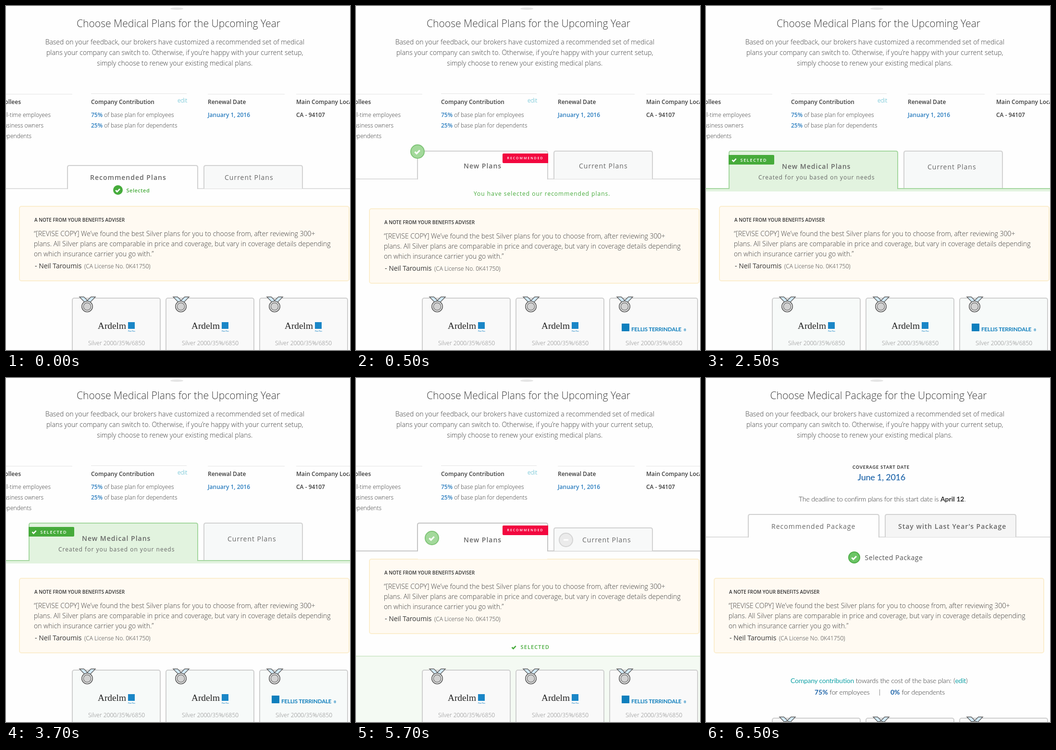
These frames come from a looping animation (716x716 px, 8000 ms). An HTML page:

```html
<!DOCTYPE html>
<html lang="en">
<head>
<meta charset="utf-8">
<title>Medical plan tabs</title>
<style>
html, body { margin: 0; width: 100%; height: 100%; overflow: hidden; background: #fefefe; }
svg { display: block; width: 716px; height: 716px; font-family: "Open Sans", sans-serif; }
text { white-space: pre; }
.lato { font-family: Lato, sans-serif; }
.serif { font-family: "Liberation Serif", serif; }
</style>
</head>
<body>
<svg id="stage" viewBox="0 0 716 716"></svg>
<script>
const INK = '#3c3c3c', GREY = '#666', BLUE = '#2a7dbf', NAVY = '#1c63a8', TEAL = '#14a3a8';
const GREEN = '#46ab3b', LOGO = '#0f7fbd', EDGE = '#d0d0d0';
const LOOP = 8000, STARTS = [0, 500, 2500, 4500, 6500];

const text = (x, y, str, size, weight = 300, fill = INK, ls = 0, extra = '') =>
  `<text x="${x}" y="${y}" font-size="${size}" font-weight="${weight}" fill="${fill}" letter-spacing="${ls}" ${extra}>${str}</text>`;
const mid = (x, y, str, size, weight, fill) => text(x, y, str, size, weight, fill, 0, 'text-anchor="middle"');
const end = (x, y, str, size, weight) => text(x, y, str, size, weight, INK, 0, 'text-anchor="end"');
const lato = (x, y, str, size, weight, fill, ls) => text(x, y, str, size, weight, fill, ls, 'class="lato"');
const thin = (x, y, str) => lato(x, y, str, 14, 300, '#2c2c2c', -0.15);
const bold = (str, fill = '#2c2c2c') => `<tspan font-weight="700" letter-spacing="0" fill="${fill}">${str}</tspan>`;
const teal = str => `<tspan font-weight="400" letter-spacing="-0.25" fill="${TEAL}">${str}</tspan>`;
const rect = (x, y, w, h, fill, extra = '') => `<rect x="${x}" y="${y}" width="${w}" height="${h}" fill="${fill}" ${extra}/>`;
const path = (d, fill, stroke = 'none', width = 2) => `<path d="${d}" fill="${fill}" stroke="${stroke}" stroke-width="${width}"/>`;
const disc = (x, y, r, fill, stroke = 'none', width = 2) =>
  `<circle cx="${x}" cy="${y}" r="${r}" fill="${fill}" stroke="${stroke}" stroke-width="${width}"/>`;
const group = (x, y, body) => `<g transform="translate(${x} ${y})">${body}</g>`;
const check = (x, y, s, color) => path(`M${x - 5 * s} ${y}l${3.6 * s} ${3.6 * s}l${6.6 * s} ${-6.8 * s}`, 'none', color, 3.2 * s);

const tabPath = (l, r, top, base) => `M${l} ${base}V${top + 4}q0-4 4-4H${r - 4}q4 0 4 4V${base}`;
// Open tab joined to the line that runs across the page.
const openTab = (l, r, top, base, color = EDGE, fill = '#fefefe', line = '#dedede') =>
  path(tabPath(l, r, top, base + 1), fill) +
  path(`M0 ${base}H${l}M${r} ${base}H716`, 'none', line) +
  path(tabPath(l, r, top, base + 1), 'none', color);
const sideTab = (l, r, top, base, fill = '#f8f9f9') => path(tabPath(l, r, top, base), fill, '#d2d2d2');

const label = (x, y, str, weight = 400, ls = 1) => text(x, y, str, 14, weight, GREY, ls);
const ribbon = () => path('M305 307H400V327H307q-2 0-2-2V309q0-2 2-2Z', '#f2083f') +
  text(314.5, 319.3, 'RECOMMENDED', 7, 600, '#fff', 1.95);

const header = title =>
  '<ellipse cx="355.500" cy="5.500" rx="13.500" ry="2.500" fill="#e5e5e5"/>' +
  mid(359, 44, title, 21.1) +
  ['Based on your feedback, our brokers have customized a recommended set of medical',
   'plans your company can switch to. Otherwise, if you’re happy with your current setup,',
   'simply choose to renew your existing medical plans.'
  ].map((s, i) => mid(351.3, 80 + 22 * i, s, 14)).join('');

const facts = () =>
  [[0, 138, 183.5], [177, 376, 182.5], [420, 580, 183.5], [604, 716, 183.5]]
    .map(([a, b, y]) => path(`M${a} ${y}H${b}`, 'none', '#e4e4e4', 1)).join('') +
  end(31, 204, 'Enrollees', 12, 600) +
  ['full-time employees', 'business owners', 'dependents']
    .map((s, i) => end([93, 78, 53][i], 231 + 22 * i, s, 12, 300)).join('') +
  text(177, 204, 'Company Contribution', 12, 600) +
  text(357, 201, 'edit', 12, 300, '#45b3c9') +
  ['75% of base plan for employees', '25% of base plan for dependents'].map((s, i) =>
    text(177, 231 + 22 * i, `<tspan font-weight="600" fill="${BLUE}">${s.slice(0, 3)}</tspan>${s.slice(3)}`, 12)).join('') +
  text(420, 204, 'Renewal Date', 12, 600) +
  text(420, 231, 'January 1, 2016', 12, 600, BLUE) +
  text(604, 204, 'Main Company Location', 12, 600) +
  text(604, 231, 'CA - 94107', 12, 600);

const note = (dx, dy) => group(dx, dy,
  rect(28, 417, 686, 155, '#fffaf2', 'rx="4" stroke="#fbeecf" stroke-width="2"') +
  text(59, 449, 'A NOTE FROM YOUR BENEFITS ADVISER', 10, 600, '#333') +
  ['“[REVISE COPY] We’ve found the best Silver plans for you to choose from, after reviewing 300+',
   'plans. All Silver plans are comparable in price and coverage, but vary in coverage details depending',
   'on which insurance carrier you go with.”'
  ].map((s, i) => text(58, 479 + 21 * i, s, 14)).join('') +
  text(60, 546, '- Neil Taroumis', 14, 400, '#333') +
  text(163, 546, '(CA License No. 0K41750)', 12));

const medal = () =>
  path('M153 605.500H162L174 617L167 620Z', '#d3eaf7', '#5f5f5f', 1.4) +
  path('M186 605.500H177L165 617L172 620Z', '#d3eaf7', '#5f5f5f', 1.4) +
  disc(169, 625.5, 11.2, '#ececec', '#5f5f5f', 1.6) + disc(169, 625.5, 7.8, '#d2d2d2', '#777', 1.4);

const serifBrand = () =>
  text(191, 672, 'Ardelm', 19.3, 400, '#222', 0, 'class="serif"') +
  rect(254, 658, 14, 14, '#1a86c7') + text(254, 678, 'Plan Plus', 3.4, 600, '#1a86c7');
const wideBrand = () =>
  rect(163, 661, 16, 16, LOGO) + lato(183, 677, 'FELLIS TERRINDALE', 11.6, 700, LOGO, -0.2) +
  lato(292, 677, '®', 6.5, 700, LOGO);

const cards = (wide, fill = '#f9f9f9', dy = 0) => [0, 195, 390].map((dx, i) => group(dx, dy,
  rect(138, 608, 183, 140, fill, 'rx="4" stroke="#cfcfcf" stroke-width="2"') + medal() +
  (wide && i === 2 ? wideBrand() : group(i === 2 ? -1 : 0, 0, serifBrand())) +
  mid(i === 2 && !wide ? 229 : 230, 706, 'Silver 2000/35%/6850', 12, 300, '#888'))).join('');

const CHOOSE = 'Choose Medical Plans for the Upcoming Year';

const scenes = [
  () => header(CHOOSE) + facts() +
    openTab(128, 399, 332, 380) + sideTab(412, 617, 332, 380) +
    label(175, 362, 'Recommended Plans', 600) + label(455, 362, 'Current Plans') +
    disc(233, 383, 10, GREEN) + check(232.5, 383.5, 0.85, '#fff') +
    text(250.5, 388, 'Selected', 11, 600, GREEN, 0.5) +
    note(0, 0) + cards(false),

  () => header(CHOOSE) + facts() +
    openTab(128, 399, 302, 360) + sideTab(412, 617, 302, 360) + ribbon() +
    disc(128, 303, 14, '#a3d99b', '#7fc477') + check(127.5, 303.5, 1, '#fff') +
    label(224, 338, 'New Plans', 600) + label(464, 338, 'Current Plans') +
    text(245, 395, 'You have selected our recommended plans.', 12, 400, GREEN, 1) +
    note(0, 5) + cards(true),

  () => header(CHOOSE) + facts() +
    rect(0, 380, 716, 6, '#e2f3df') + sideTab(412, 617, 302, 380, '#f7f9f9') +
    openTab(48, 399, 302, 380, '#a5d7a0', '#e2f3df', '#a5d7a0') +
    path('M47 310H140q2 0 2 2V328q0 2-2 2H47Z', GREEN) + check(58.5, 320.5, 0.8, '#fff') +
    text(71.5, 324, 'SELECTED', 9, 600, '#fff', 1.7) +
    label(158, 339, 'New Medical Plans', 600) +
    text(109, 361, 'Created for you based on your needs', 12, 400, GREY, 1) +
    label(461, 340, 'Current Plans') +
    note(0, 0) + cards(true, '#f7faf9'),

  () => header(CHOOSE) + facts() +
    note(0, -40) + rect(129, 361, 269, 16, '#fefefe') +
    openTab(128, 399, 302, 360, '#c4c4c4', '#fefefe', '#c9c9c9') + sideTab(412, 617, 312, 360) + ribbon() +
    disc(158, 333, 14, '#a3d99b', '#7fc477') + check(157.5, 333.5, 1, '#fff') +
    disc(437, 337, 14, '#ebebeb', '#d4d4d4') + rect(432, 335.5, 10, 3, '#fff') +
    label(224, 342, 'New Plans', 600) + label(471, 342, 'Current Plans') +
    check(328.5, 560.5, 0.8, GREEN) + text(342.5, 564, 'SELECTED', 11, 600, GREEN, 1.1) +
    rect(0, 578, 716, 138, '#f4faf3') + rect(0, 578, 716, 2, '#d5ebd1') +
    cards(true),

  () => header('Choose Medical Package for the Upcoming Year') +
    lato(305, 189, 'COVERAGE START DATE', 9, 700, '#333', 0.9) +
    lato(315.5, 213, 'June 1, 2016', 18, 500, NAVY, -0.25) +
    thin(193, 257, `The deadline to confirm plans for this start date is ${bold('April 12')}.`) +
    openTab(88, 360, 284, 331) + sideTab(373, 645, 284, 331, '#f5f5f5') +
    label(136, 314, 'Recommended Package') + label(400, 314, 'Stay with Last Year’s Package', 600) +
    disc(308.5, 373.5, 11.5, '#6cc566', '#4fae49') + check(308, 374, 0.95, '#fff') +
    text(330.5, 379, 'Selected Package', 14, 400, '#555', 0.55) +
    note(-11, 0) +
    thin(176, 635, `${teal('Company contribution')} towards the cost of the base plan:`) +
    thin(515, 635, `(${teal('edit')})`) +
    thin(226, 659, `${bold('75%', NAVY)} for employees`) +
    thin(360, 659, '|') +
    thin(384, 659, `${bold('0%', NAVY)} for dependents`) +
    cards(true, '#f9f9f9', 100)
];

const stage = document.getElementById('stage');
stage.innerHTML = scenes.map(draw => `<g>${draw()}</g>`).join('');
const layers = [...stage.children];

function show(now) {
  const t = now % LOOP;
  const active = STARTS.filter(s => s <= t).length - 1;
  layers.forEach((g, i) => { g.style.display = i === active ? '' : 'none'; });
}
const born = performance.now();
function tick() {
  show(performance.now() - born);
  requestAnimationFrame(tick);
}
show(0);
requestAnimationFrame(tick);
</script>
</body>
</html>
```
